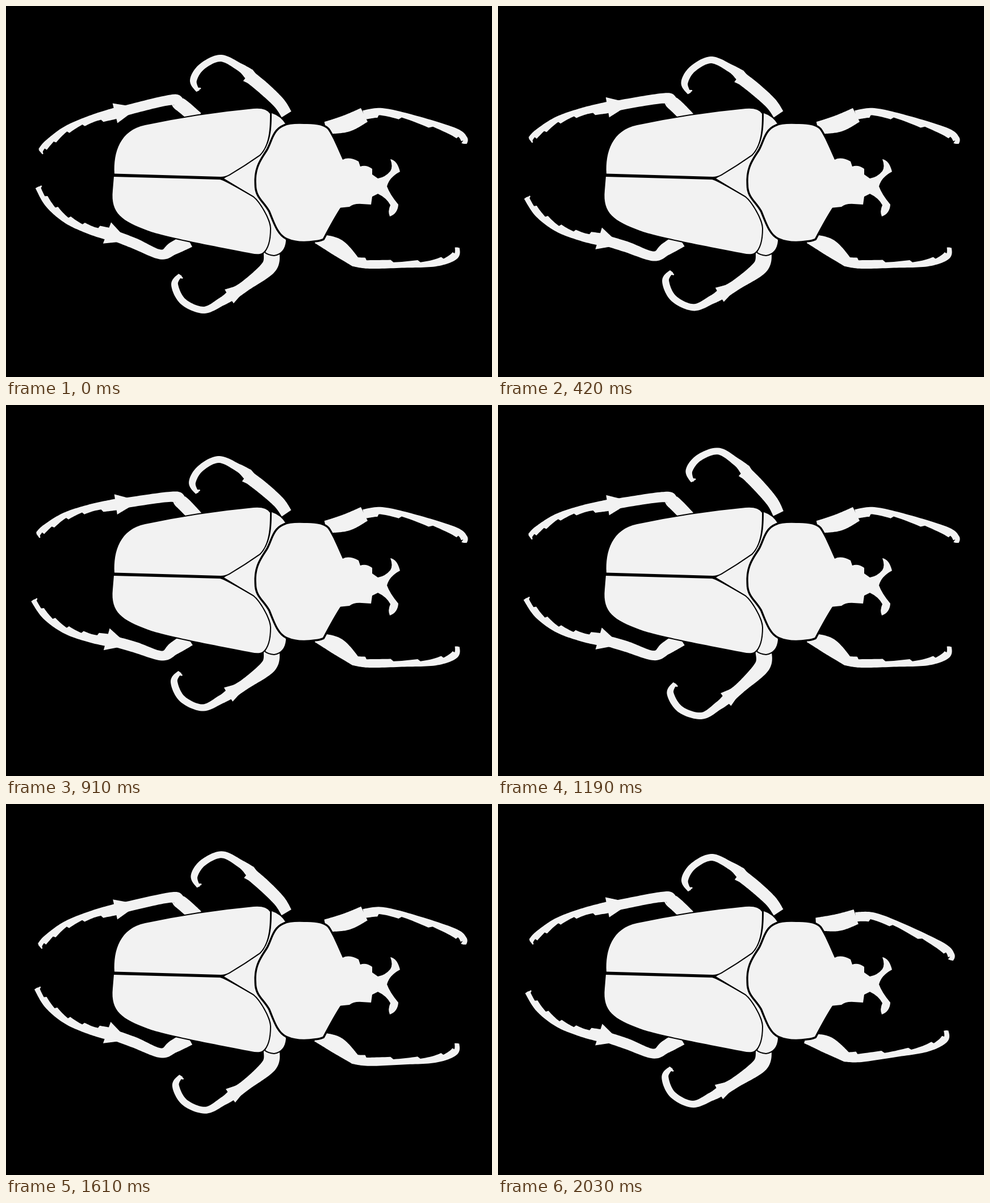
Write an HTML page with a canvas that moves like this. It is 856 px wide and 654 px high and loops after 2.1 s.

```html
<!DOCTYPE html>
<html lang="en">
<head>
<meta charset="utf-8">
<title>Beetle</title>
<style>
html, body { margin: 0; width: 100%; height: 100%; overflow: hidden; background: #000; }
canvas { display: block; }
</style>
</head>
<body>
<canvas id="stage" width="856" height="654"></canvas>
<script>
const ctx = document.getElementById('stage').getContext('2d');
const INK = '#f2f2f2';
const STEP = 70, STEPS = 30, GAIT = 7.5;
const SAMPLES = 64, TEETH = 6, TOOTH = 4.5;

const topWing = new Path2D(`M191 295.5 C189 258 201 219 245 210 Q340 190 436 181
  Q458 179 465 190 C465 215 464 245 447 262 Q420 281 393 297 Q386 301 378 301 Z`);
const lowWing = new Path2D(`M190 301 L377 306 Q384 307 435 337 C446 345 465 377 465 392
  Q465 425 452 435 Q446 439 432 436 C370 424 280 407 250 396 C205 379 184 366 188 325 Z`);
const scutellum = new Path2D(`M384 304 L440 269 C465 250 468 225 468 189
  Q484 194 493 209 L480 300 L493 414 Q491 436 472 439 Q462 438 457 434
  Q475 395 437 336 Z`);
const thorax = new Path2D(`M490 212 Q500 207 525 208 Q558 207 567 218
  C575 229 585 253 593 271 L590 354 Q578 372 558 410 Q550 413 545 413
  Q515 418 495 409 C480 402 474 383 465 361 C455 343 441 337 441 315
  C439 283 452 270 462 253 C470 238 472 219 490 212 Z`);
const head = new Path2D(`M585 270 L593 271 Q604 265 621 274 L624 283 Q634 279 645 287
  L645 297 L655 304 Q668 302 677 291 Q682 283 677 270 Q689 272 694 292
  Q675 302 671 318 Q676 332 691 350 Q690 366 676 371 Q672 362 677 351
  Q670 338 655 331 L645 336 L643 350 L627 349 Q612 348 605 354 L585 356 Z`);

// Smooth spine through [x, y, width] nodes.
function spine(nodes) {
  const last = nodes.length - 1;
  const at = i => nodes[Math.max(0, Math.min(last, i))];
  return Array.from({ length: SAMPLES + 1 }, (_, k) => {
    const s = k / SAMPLES * last, i = Math.min(last - 1, Math.floor(s)), t = s - i;
    const [a, b, c, d] = [at(i - 1), at(i), at(i + 1), at(i + 2)];
    return b.map((v, j) => v + t / 2 * (c[j] - a[j] +
      t * (2 * a[j] - 5 * v + 4 * c[j] - d[j] + t * (3 * (v - c[j]) + d[j] - a[j]))));
  });
}

function heading(line, i) {
  const a = line[Math.max(0, i - 1)], b = line[Math.min(line.length - 1, i + 1)];
  const dx = b[0] - a[0], dy = b[1] - a[1], len = Math.hypot(dx, dy);
  return [dx / len, dy / len];
}

// Tapered band around a spine, saw-toothed on one side.
function limb(line, side = 1, tooth = 0) {
  const edge = sign => line.map(([x, y, w], i) => {
    const [tx, ty] = heading(line, i);
    const saw = sign === side ? tooth * (i / SAMPLES * TEETH % 1) : 0;
    const r = sign * (w / 2 + saw);
    return [x - ty * r, y + tx * r];
  });
  const path = new Path2D();
  [...edge(1), ...edge(-1).reverse()].forEach(p => path.lineTo(...p));
  path.closePath();
  return path;
}

function leg({ pivot, side, shin, foot, spur = 0, tooth = 0, hook = 0 }) {
  const upper = spine(shin), lower = spine(foot);
  const parts = [limb(upper), limb(lower, side, tooth)];
  if (spur) {
    const [x, y] = upper[SAMPLES], [tx, ty] = heading(upper, SAMPLES);
    parts.push(limb(spine([[x - 26 * tx, y - 26 * ty, 14], [x, y, spur]])));
  }
  if (hook) {
    const i = SAMPLES - 3, [x, y] = lower[i], [tx, ty] = heading(lower, i);
    const tip = [x + hook * (tx * 0.3 - ty * side), y + hook * (ty * 0.3 + tx * side), 2];
    parts.push(limb(spine([[x, y, 6], tip])));
  }
  return { pivot, parts };
}

const legs = {
  backTop: leg({
    pivot: [330, 195], side: -1, spur: 36, tooth: TOOTH, hook: 9,
    shin: [[336, 198, 24], [306, 173, 24], [287, 166, 18], [192, 189, 18]],
    foot: [[196, 188, 20], [150, 198, 11], [105, 217, 10], [72, 242, 10], [59, 254, 5]]
  }),
  backLow: leg({
    pivot: [316, 415], side: 1, spur: 40, tooth: TOOTH, hook: 9,
    shin: [[322, 413, 26], [295, 427, 23], [272, 438, 17], [225, 418, 19], [178, 400, 18]],
    foot: [[184, 403, 22], [148, 396, 13], [107, 378, 11], [74, 350, 10], [54, 320, 5]]
  }),
  midTop: leg({
    pivot: [490, 190], side: -1, spur: 26, hook: 7,
    shin: [[494, 191, 20], [481, 171, 21], [454, 145, 22], [426, 122, 22]],
    foot: [[428, 120, 20], [412, 108, 14], [378, 92, 12], [345, 107, 12], [330, 131, 12], [338, 150, 6]]
  }),
  midLow: leg({
    pivot: [467, 438], side: 1, spur: 29, hook: 7,
    shin: [[468, 434, 28], [463, 460, 27], [422, 493, 19], [393, 512, 22]],
    foot: [[394, 512, 18], [380, 521, 15], [348, 536, 12], [312, 521, 12], [297, 491, 12], [307, 474, 7]]
  }),
  foreTop: leg({
    pivot: [585, 193], side: 1, tooth: TOOTH,
    shin: [[563, 215, 22], [600, 207, 30], [631, 192, 27]],
    foot: [[630, 192, 16], [662, 186, 12], [715, 196, 9], [788, 220, 12], [808, 233, 9], [809, 243, 5]]
  }),
  foreLow: leg({
    pivot: [573, 459], side: -1, tooth: TOOTH,
    shin: [[547, 410, 17], [583, 425, 30], [616, 452, 18]],
    foot: [[612, 451, 16], [640, 456, 14], [700, 457, 9], [757, 454, 10], [791, 442, 10], [797, 426, 4]]
  })
};

// Linear interpolation through [time, value] keys.
function track(keys, t) {
  const i = Math.max(1, keys.findIndex(k => k[0] >= t));
  const [t0, a] = keys[i - 1], [t1, b] = keys[i];
  return a + (b - a) * (t - t0) / (t1 - t0);
}

const swing = {
  back: [[0, 0], [3.95, 0.178], [GAIT, 0]],
  midTop: [[0, 0], [2.05, 0.101], [4.6, -0.049], [6, -0.027], [GAIT, 0]],
  midLow: [[0, 0], [0.5, 0.032], [2.05, 0.107], [6.7, -0.064], [GAIT, 0]]
};

function drawLeg({ pivot: [x, y], parts }, angle) {
  ctx.save();
  ctx.translate(x, y);
  ctx.rotate(angle);
  ctx.translate(-x, -y);
  parts.forEach(p => ctx.fill(p));
  ctx.restore();
}

function drawPlate(path, gap) {
  ctx.lineWidth = gap;
  ctx.stroke(path);
  ctx.fill(path);
}

function draw(step) {
  const phase = step % GAIT;
  const back = track(swing.back, phase);
  const reach = Math.max(0, step - 22);

  ctx.fillStyle = '#000';
  ctx.fillRect(0, 0, 856, 654);
  ctx.fillStyle = INK;
  ctx.strokeStyle = '#000';
  ctx.lineJoin = 'round';

  drawLeg(legs.backTop, back);
  drawLeg(legs.backLow, -back * 0.93);
  drawLeg(legs.midTop, track(swing.midTop, phase));
  drawLeg(legs.midLow, -track(swing.midLow, phase));
  drawLeg(legs.foreTop, reach * 0.0213);
  drawLeg(legs.foreLow, -reach * 0.0172);

  drawPlate(scutellum, 4);
  drawPlate(topWing, 4);
  drawPlate(lowWing, 4);
  drawPlate(thorax, 7);
  ctx.fill(head);
}

const start = performance.now();
function tick() {
  draw(Math.floor((performance.now() - start) / STEP) % STEPS);
  requestAnimationFrame(tick);
}
tick();
</script>
</body>
</html>
```
